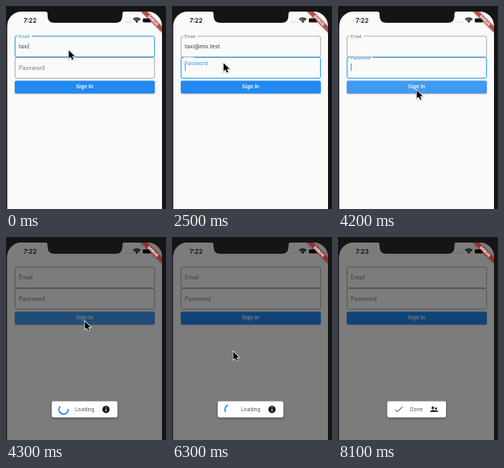
Write an HTML page with a canvas that moves like this. It is 200x254 px and loops after 8900 ms.

```html
<!DOCTYPE html>
<html lang="en">
<head>
<meta charset="utf-8">
<title>Sign in form</title>
<style>
html, body { margin: 0; width: 100%; height: 100%; overflow: hidden; background: #151515; }
canvas { display: block; width: 200px; height: 254px; }
</style>
</head>
<body>
<canvas id="stage"></canvas>
<script>
const LOOP = 8900, BLUE = '#2196f3', BEZEL = '#151515', INK = 'rgba(0,0,0,.76)';
const EMAIL = 'taxi@mo.test';
const canvas = document.getElementById('stage');
const ctx = canvas.getContext('2d');
const ratio = window.devicePixelRatio || 1;
canvas.width = 200 * ratio;
canvas.height = 254 * ratio;

// Times at which a character of the address appears, after the first four.
const KEYS = [500, 1000, 1100, 1200, 1400, 1500, 1600, 1700];
// The spinner skips some ticks, so it holds between these times.
const SPIN_TICKS = [4300, 4400, 4500, 4600, 4700, 4900, 5000, 5200, 5400, 5500, 5600,
  5800, 6000, 6300, 6500, 6600, 6700, 6800, 7000, 7100, 7400, 7500, 7600, 7700];
// Pointer path: time, x, y
const POINTER = [[0, 78, 55], [2000, 78, 55], [2400, 64, 71], [3000, 64, 71], [3800, 98, 105],
  [5900, 98, 105], [6000, 90, 120], [6200, 90, 120], [6300, 76, 143], [7000, 76, 143]];

const clamp = v => Math.min(1, Math.max(0, v));
const ramp = (t, from, to) => clamp((t - from) / (to - from));
const mix = (a, b, p) => a + (b - a) * p;

// cubic-bezier(.4, 0, .2, 1)
function ease(x) {
  let lo = 0, hi = 1, u = .5;
  for (let i = 0; i < 14; i++) {
    u = (lo + hi) / 2;
    const at = 1.2 * u * (1 - u) ** 2 + .6 * u * u * (1 - u) + u ** 3;
    if (at < x) lo = u; else hi = u;
  }
  return 3 * u * u * (1 - u) + u ** 3;
}

function text(str, x, y, size, color, weight = 400, align = 'left') {
  ctx.font = `${weight} ${size}px Inter, Roboto, sans-serif`;
  ctx.fillStyle = color;
  ctx.textAlign = align;
  ctx.textBaseline = 'alphabetic';
  ctx.fillText(str, x, y + size * .36);
}

function box(x, y, w, h, r, color) {
  ctx.fillStyle = color;
  ctx.beginPath();
  ctx.roundRect(x, y, w, h, r);
  ctx.fill();
}

function disc(x, y, r, color) {
  ctx.fillStyle = color;
  ctx.beginPath();
  ctx.arc(x, y, r, 0, 7);
  ctx.fill();
}

function stroke(path, color, width) {
  ctx.strokeStyle = color;
  ctx.lineWidth = width;
  ctx.stroke(new Path2D(path));
}

function shadowed(blur, dy, color, draw) {
  ctx.save();
  ctx.shadowColor = color;
  ctx.shadowBlur = blur * ratio;
  ctx.shadowOffsetY = dy * ratio;
  draw();
  ctx.restore();
}

// Outlined field whose label floats into a gap in the border.
function field(top, label, labelWidth, lift, focused, value, caret) {
  const gap = 14.5 + labelWidth * lift, bottom = top + 26;
  const left = 11.3, right = 185.7;
  stroke(`M${lift ? gap : 14.5} ${top}H${right - 2}q2 0 2 2V${bottom - 2}q0 2 -2 2H${left + 2}` +
    `q-2 0 -2 -2V${top + 2}q0 -2 2 -2H14.5`, focused ? BLUE : 'rgba(0,0,0,.46)', focused ? 1 : .7);
  text(label, 16, mix(top + 12.7, top + .4, lift), mix(7, 5.3, lift),
    focused ? BLUE : 'rgba(0,0,0,.54)');
  text(value, 16, top + 12.3, 7.1, INK);
  if (caret > 0) {
    ctx.globalAlpha = caret;
    box(16.2 + ctx.measureText(value).width, top + 7.5, .9, 9.5, .4, BLUE);
    ctx.globalAlpha = 1;
  }
}

function statusBar(t) {
  text(t < 7400 ? '7:22' : '7:23', 22, 18, 7.7, '#111', 600);
  for (let i = 0; i < 4; i++) disc(149.4 + i * 2.4, 20, .6, 'rgba(0,0,0,.35)');
  ctx.lineCap = 'butt';
  for (const r of [2.4, 4.4, 6.2]) {
    ctx.beginPath();
    ctx.arc(163.5, 21, r, -Math.PI * .76, -Math.PI * .24);
    ctx.strokeStyle = '#111';
    ctx.lineWidth = 1.2;
    ctx.stroke();
  }
  disc(163.5, 20.2, .9, '#111');
  box(171, 15.4, 10.6, 5.2, 1.3, '#111');
  box(182.2, 17, .8, 2, .4, '#777');
}

function form(t) {
  const typed = 4 + KEYS.filter(k => k <= t).length;
  const onPassword = t >= 2400 && t < 4300, onEmail = t < 2400;
  const emailCaret = !onEmail ? 0 : t < 500 ? .6 - t / 333 : t < 2000 ? 1 : .6 - (t - 2000) / 333;
  const passwordCaret = !onPassword ? 0 : t < 3300 ? 1 - ramp(t, 2900, 3200) : ramp(t, 3400, 3700);
  const lift = onPassword ? ramp(t, 2400, 2620) : 0;
  const email = () => field(37.8, 'Email', 17.5, t < 4300 ? 1 : 0, onEmail,
    t < 4200 ? EMAIL.slice(0, typed) : '', emailCaret);
  const password = () => field(64.3, 'Password', 28.5, lift, onPassword, '', passwordCaret);
  email();
  password();

  shadowed(1.5, .8, 'rgba(0,0,0,.4)', () => box(11, 93.5, 175, 15.8, 1.8, '#2089f2'));
  if (t >= 4000 && t < 4700) {
    box(11, 93.5, 175, 15.8, 1.8, `rgba(255,255,255,${.14 * (1 - ramp(t, 4300, 4700))})`);
  }
  text('Sign In', 98.3, 101.1, 6.5, '#fff', 600, 'center');
}

function debugBanner() {
  ctx.save();
  ctx.translate(195, 7);
  ctx.rotate(Math.PI / 4);
  shadowed(2.8, 0, 'rgba(0,0,0,.5)', () => box(-18.6, 13, 37.2, 5.6, 0, 'rgba(183,28,28,.66)'));
  text('DEBUG', 0, 15.8, 4.7, '#fff', 900, 'center');
  ctx.restore();
}

function spinner(t) {
  const tick = SPIN_TICKS.filter(k => k <= t).pop();
  const run = 370 + (tick - 4300) * .95;
  const phase = run / 1333 % 1, turn = Math.PI * 1.5;
  const head = ease(clamp(phase * 2)) * turn, tail = ease(clamp(phase * 2 - 1)) * turn;
  const start = -Math.PI / 2 + tail + run / 2222 * Math.PI * 2 + phase * Math.PI / 2;
  ctx.beginPath();
  ctx.arc(72, 215.8, 5.8, start, start + Math.max(head - tail, .01));
  ctx.strokeStyle = '#2089f2';
  ctx.lineWidth = 1.7;
  ctx.stroke();
}

function person(x, y, s) {
  disc(x, y - 2 * s, 1.7 * s, '#222');
  ctx.fill(new Path2D(`M${x - 3.3 * s} ${y + 3.2 * s}v${-s}q${3.3 * s} ${-3.4 * s} ${6.6 * s} 0v${s}z`));
}

function toast(t) {
  const swap = ramp(t, 7400, 7900), p = ease(swap);
  const left = mix(57.2, 61.5, p), right = mix(139.3, 135, p);
  shadowed(3, 1, 'rgba(0,0,0,.45)', () => box(left, 205.5, right - left, 20.3, 2, '#fff'));
  ctx.save();
  if (swap < 1) {
    ctx.globalAlpha = clamp(1 - swap * 2);
    spinner(t);
    text('Loading', 98.3, 215.8, 6.4, '#555', 400, 'center');
    disc(125, 215.8, 4.6, '#1c1c1c');
    box(124.5, 215.2, 1, 3, 0, '#fff');
    box(124.5, 213.2, 1, 1.1, 0, '#fff');
  }
  if (swap > .5) {
    ctx.globalAlpha = swap * 2 - 1;
    stroke('M71.6 216l2.6 2.6l6.2 -6.2', '#222', 1);
    text('Done', 98, 215.8, 6.4, '#555', 400, 'center');
    person(122.6, 216.3, .8);
    person(118.6, 215.8, 1);
  }
  ctx.restore();
}

function pointer(t) {
  if (t >= 7000) return;
  const i = POINTER.findIndex(k => k[0] > t);
  const [t0, x0, y0] = POINTER[i - 1], [t1, x1, y1] = POINTER[i];
  const p = (t - t0) / (t1 - t0), e = p * p * (3 - 2 * p);
  ctx.save();
  ctx.translate(mix(x0, x1, e), mix(y0, y1, e));
  const arrow = new Path2D('M.5 .5V10.6L2.9 8.4L4.6 12.2L6.3 11.4L4.6 7.7H7.9Z');
  ctx.strokeStyle = '#fff';
  ctx.lineWidth = 1.5;
  shadowed(1.5, .6, 'rgba(0,0,0,.35)', () => ctx.stroke(arrow));
  ctx.fillStyle = '#000';
  ctx.fill(arrow);
  ctx.restore();
}

function draw(t) {
  ctx.setTransform(ratio, 0, 0, ratio, 0, 0);
  ctx.fillStyle = BEZEL;
  ctx.fillRect(0, 0, 200, 254);
  ctx.save();
  ctx.beginPath();
  ctx.roundRect(1.5, 7, 193.5, 290, 18);
  ctx.clip();
  ctx.fillStyle = '#fafafa';
  ctx.fillRect(0, 0, 200, 254);
  statusBar(t);
  form(t);
  if (t >= 4300) {
    ctx.fillStyle = 'rgba(0,0,0,.5)';
    ctx.fillRect(0, 0, 200, 254);
    toast(t);
  }
  debugBanner();
  ctx.restore();
  ctx.fillStyle = BEZEL;
  ctx.fill(new Path2D('M48 6.5q4 0 4 4v2q0 8.5 8.5 8.5h76.5q8.5 0 8.5 -8.5v-2q0 -4 4 -4z'));
  pointer(t);
}

const begin = performance.now();
function frame() {
  const t = (performance.now() - begin) % LOOP;
  draw(Math.floor(t / 100) * 100);
  requestAnimationFrame(frame);
}
frame();
</script>
</body>
</html>
```
